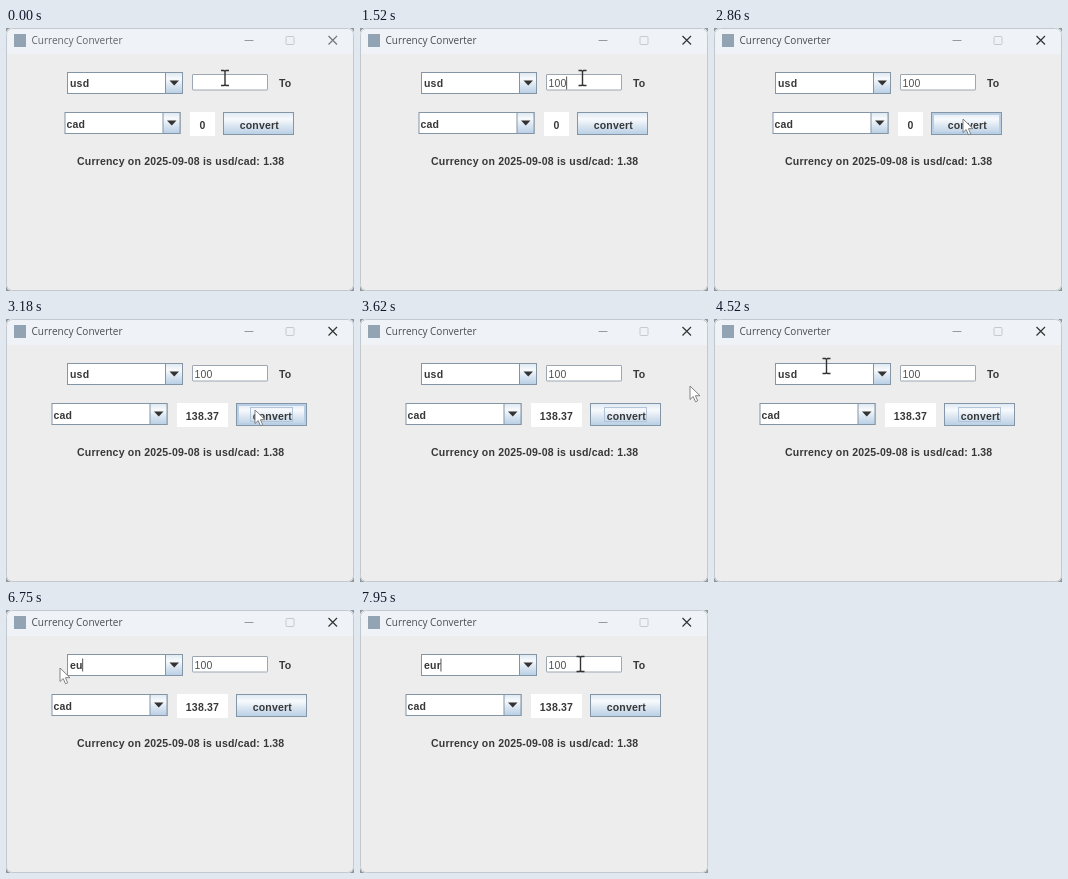
These frames come from a looping animation (348x263 px, 8 s). An HTML page:

```html
<!DOCTYPE html>
<html lang="en">
<head>
<meta charset="utf-8">
<title>Currency Converter</title>
<style>
  html, body { margin: 0; width: 100%; height: 100%; overflow: hidden; background: #8f969c; }
  svg { display: block; width: 348px; height: 263px; }
  text { font: bold 10.5px "Liberation Sans", Arial, sans-serif; letter-spacing: .2px; fill: #383838; white-space: pre; }
  .title { font: 10px "Open Sans", "Noto Sans", sans-serif; letter-spacing: 0; fill: #4a4d50; }
  .plain { font-weight: normal; fill: #505050; }
  .mid { text-anchor: middle; }
  .edge { stroke: #8496a6; }
  .line { fill: none; stroke: #333; }
  .inactive .title { fill: #606468; }
  .inactive .line { stroke: #777; }
</style>
</head>
<body>
<svg viewBox="0 0 348 263">
  <defs>
    <linearGradient id="ocean" x2="0" y2="1">
      <stop offset="0" stop-color="#dde8f3"/>
      <stop offset=".3" stop-color="#f8fafc"/>
      <stop offset=".6" stop-color="#dbe6f1"/>
      <stop offset="1" stop-color="#b8cfe5"/>
    </linearGradient>
    <clipPath id="frame"><rect width="348" height="263" rx="6"/></clipPath>
    <g id="combo">
      <rect class="edge" x=".5" y=".5" width="115" height="21" fill="#fff"/>
      <rect class="edge" x="98.5" y=".5" width="17" height="21" fill="url(#ocean)"/>
      <path d="M102.5 8.5h9.5l-4.75 5z" fill="#333"/>
    </g>
  </defs>

  <g clip-path="url(#frame)">
    <rect width="348" height="263" fill="#ededed"/>
    <rect width="348" height="26" fill="#eff3f8"/>
    <rect x=".5" y=".5" width="347" height="262" rx="6" fill="none" stroke="#c2c8cd"/>
  </g>
  <g id="bar">
    <rect x="8" y="6" width="12" height="13" fill="#92a3b3"/>
    <text class="title" x="25.5" y="16">Currency Converter</text>
    <path d="M238.5 12.5h9" stroke="#999"/>
    <rect x="280" y="8.5" width="8" height="8" rx="1" fill="none" stroke="#c6cacf"/>
    <path class="line" d="M322.5 8l8.5 8.5m0-8.5l-8.5 8.5" stroke-width="1.2"/>
  </g>

  <use href="#combo" x="61" y="44"/>
  <rect id="selection" x="64" y="48" width="20" height="14" fill="#a3b8cc"/>
  <text id="from" x="64" y="59.3"></text>
  <rect x="186.5" y="46.5" width="75" height="15.5" rx=".5" fill="#fff" stroke="#9ca7b1"/>
  <text id="amount" class="plain" x="188.5" y="59.3"></text>
  <text x="273" y="59.3">To</text>
  <path id="caret" d="M0 48.5v13" stroke="#555"/>

  <g id="target">
    <use href="#combo" x="58.5" y="84"/>
    <text x="60.5" y="99.5">cad</text>
  </g>
  <rect id="resultBox" y="84" height="24" fill="#fff"/>
  <text id="result" class="mid" x="196.5" y="101"></text>
  <g id="button">
    <rect class="edge" x="217.5" y="84.5" width="70" height="22" fill="url(#ocean)"/>
    <rect id="hover" x="219" y="86" width="67" height="19" fill="none" stroke="#b8cfe5" stroke-width="2"/>
    <rect id="focus" x="231.5" y="88.5" width="42" height="14" fill="none" stroke="#b2c5d8"/>
    <text class="mid" x="253.3" y="101">convert</text>
  </g>
  <text x="71" y="137.3">Currency on 2025-09-08 is usd/cad: 1.38</text>

  <path id="beam" class="line" d="M-4 -7.5h3l1 1 1-1h3M0 -6.5v13M-4 7.5h3l1-1 1 1h3" stroke-width="1.4"/>
  <path id="arrow" d="M0 0v13.5l3.2-3 2.3 5.3 2.2-1-2.3-5.1H10z" fill="#fff" stroke="#777" stroke-width=".9" stroke-linejoin="round"/>
</svg>
<script>
const LOOP = 8000, TICK = 150;
const ACTIVATE = 300, FOCUS_AMOUNT = 600, TYPE_AMOUNT = 1050, LEAVE_AMOUNT = 2100;
const PRESS = 3000, RESULT = 3150, DRAG = 5100, SELECT = 5400, TYPE_FROM = 6300;

// Pointer moves: start time, end time, destination.
const home = { x: 219, y: 50 };
const moves = [
  [0, 450, 222.5, 50],
  [1850, 2700, 249, 91],
  [3150, 3600, 330, 67],
  [3850, 4500, 112.5, 47],
  [4500, 4950, 85, 56],
  [DRAG, 5550, 54, 58],
  [7350, 7950, 220.5, 54]
];

const $ = id => document.getElementById(id);
const show = (id, on) => $(id).setAttribute("visibility", on ? "visible" : "hidden");
const move = (id, x, y) => $(id).setAttribute("transform", `translate(${x} ${y})`);
const between = (t, from, to) => t >= from && t < to;
const typed = (text, t, start, pace) => text.slice(0, Math.max(0, Math.floor((t - start) / pace) + 1));
const ease = u => u * u * (3 - 2 * u);

function pointerAt(t) {
  let { x, y } = home;
  for (const [start, end, toX, toY] of moves) {
    const u = ease(Math.min(1, Math.max(0, (t - start) / (end - start))));
    x += (toX - x) * u;
    y += (toY - y) * u;
  }
  return { x, y };
}

const inside = (p, left, top, right, bottom) => between(p.x, left, right) && between(p.y, top, bottom);

function placeCaret(t, selected) {
  const field = t < DRAG ? $("amount") : $("from");
  const width = selected ? 0 : field.getComputedTextLength();
  move("caret", +field.getAttribute("x") + width, 0);
  show("caret", between(t, FOCUS_AMOUNT, LEAVE_AMOUNT) || t >= DRAG);
}

function render(time) {
  const t = Math.floor(time % LOOP / TICK) * TICK;
  const p = pointerAt(t);
  const selected = between(t, SELECT, TYPE_FROM);
  const grow = t < RESULT ? 0 : 13;

  $("bar").setAttribute("class", t < ACTIVATE ? "inactive" : "");
  $("from").textContent = t < TYPE_FROM ? "usd" : typed("eur", t, TYPE_FROM, 2 * TICK);
  $("amount").textContent = typed("100", t, TYPE_AMOUNT, 1.5 * TICK);
  $("result").textContent = grow ? "138.37" : "0";
  show("selection", selected);
  placeCaret(t, selected);

  move("target", -grow, 0);
  move("button", grow, 0);
  $("resultBox").setAttribute("x", 184 - grow);
  $("resultBox").setAttribute("width", 25 + 2 * grow);
  show("hover", inside(p, 217 + grow, 84, 288 + grow, 107));
  show("focus", between(t, PRESS, DRAG));

  const beam = inside(p, 61, 44, 159, 66) || inside(p, 186, 46, 262, 63);
  show("beam", beam);
  show("arrow", !beam);
  move(beam ? "beam" : "arrow", p.x, p.y);
}

const start = performance.now();
function tick() {
  render(performance.now() - start);
  requestAnimationFrame(tick);
}
tick();
</script>
</body>
</html>
```
